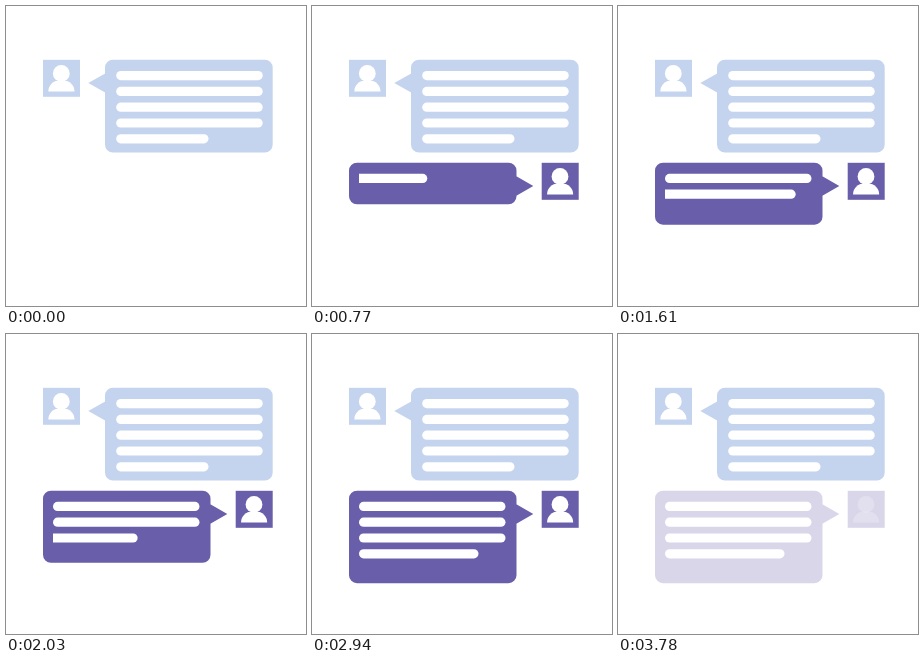
Recreate the animation shown at these times as an HTML page with a canvas. Size 300 px wide and 300 px high, loop 3.85 s.

```html
<!DOCTYPE html>
<html lang="en">
<head>
<meta charset="utf-8">
<title>Chat bubbles</title>
<style>
  html, body { margin: 0; width: 100%; height: 100%; overflow: hidden; background: #fff; }
  canvas { display: block; width: 300px; height: 300px; }
</style>
</head>
<body>
<canvas id="stage" width="300" height="300"></canvas>
<script>
const ctx = document.getElementById('stage').getContext('2d');
const LOOP = 3850, STEP = 70, HOLD_START = 2940, HOLD_END = 3640;
const BLUE = '#c5d4ee', PURPLE = '#685eaa', WHITE = '#fff';
const LINE_W = 146.5, LINE_H = 9.2, LINE_GAP = 15.8;

// Each typed line: start and end time in ms, final width
const typedLines = [
  { start: 540, end: 1050, width: LINE_W },
  { start: 1050, end: 1680, width: LINE_W },
  { start: 1665, end: 2310, width: LINE_W },
  { start: 2310, end: 2800, width: 119.5 }
];

const progress = (t, from, to) => Math.min(1, Math.max(0, (t - from) / (to - from)));

function pill(x, y, width) {
  ctx.fillStyle = WHITE;
  ctx.beginPath();
  ctx.roundRect(x, y, width, LINE_H, LINE_H / 2);
  ctx.fill();
}

function avatar(x, y, color) {
  ctx.save();
  ctx.translate(x, y);
  ctx.fillStyle = color;
  ctx.fillRect(0, 0, 37, 37);
  ctx.fillStyle = WHITE;
  ctx.beginPath();
  ctx.arc(18.3, 13.6, 8.4, 0, Math.PI * 2);
  ctx.fill();
  ctx.beginPath();
  ctx.roundRect(5.3, 20.8, 26.2, 11, [11, 11, 0, 0]);
  ctx.fill();
  ctx.restore();
}

function bubble(x, y, width, height, color, tail) {
  const shape = new Path2D();
  shape.roundRect(x, y, width, height, 8);
  shape.moveTo(...tail[0]);
  shape.lineTo(...tail[1]);
  shape.lineTo(...tail[2]);
  shape.closePath();
  ctx.fillStyle = color;
  ctx.fill(shape);
}

function question() {
  avatar(37, 53.8, BLUE);
  bubble(99, 53.7, 167.7, 92.8, BLUE, [[100, 67], [100, 87], [82.3, 77]]);
  for (let i = 0; i < 5; i++) pill(110.2, 65 + i * LINE_GAP, i < 4 ? LINE_W : 92.3);
}

function reply(t) {
  const fadeOut = t < HOLD_END ? 1 : 1 - progress(t, 3570, LOOP);
  ctx.globalAlpha = fadeOut * progress(t, 0, 280);
  avatar(229.7, 156.8, PURPLE);

  ctx.globalAlpha = fadeOut * progress(t, 210, 560);
  const height = 36.5 + 56 * progress(t, 560, 2870);
  bubble(37, 156.7, 167.5, height, PURPLE, [[203.5, 169.8], [221.3, 180], [203.5, 190.2]]);
  ctx.globalAlpha = 1;

  // Lines slide in from behind a fixed left edge
  ctx.save();
  ctx.beginPath();
  ctx.rect(47, 150, 160, 110);
  ctx.clip();
  typedLines.forEach(({ start, end, width }, i) => {
    if (t <= start) return;
    const shown = 4 + (width - 4) * progress(t, start, end);
    pill(47 + shown - width, 167.8 + i * LINE_GAP, width);
  });
  ctx.restore();
}

function draw(now) {
  let t = Math.floor((now % LOOP) / STEP) * STEP;
  if (t > HOLD_START && t < HOLD_END) t = HOLD_START;
  ctx.globalAlpha = 1;
  ctx.fillStyle = WHITE;
  ctx.fillRect(0, 0, 300, 300);
  question();
  reply(t);
}

const origin = performance.now();
function tick() {
  draw(performance.now() - origin);
  requestAnimationFrame(tick);
}
tick();
</script>
</body>
</html>
```
